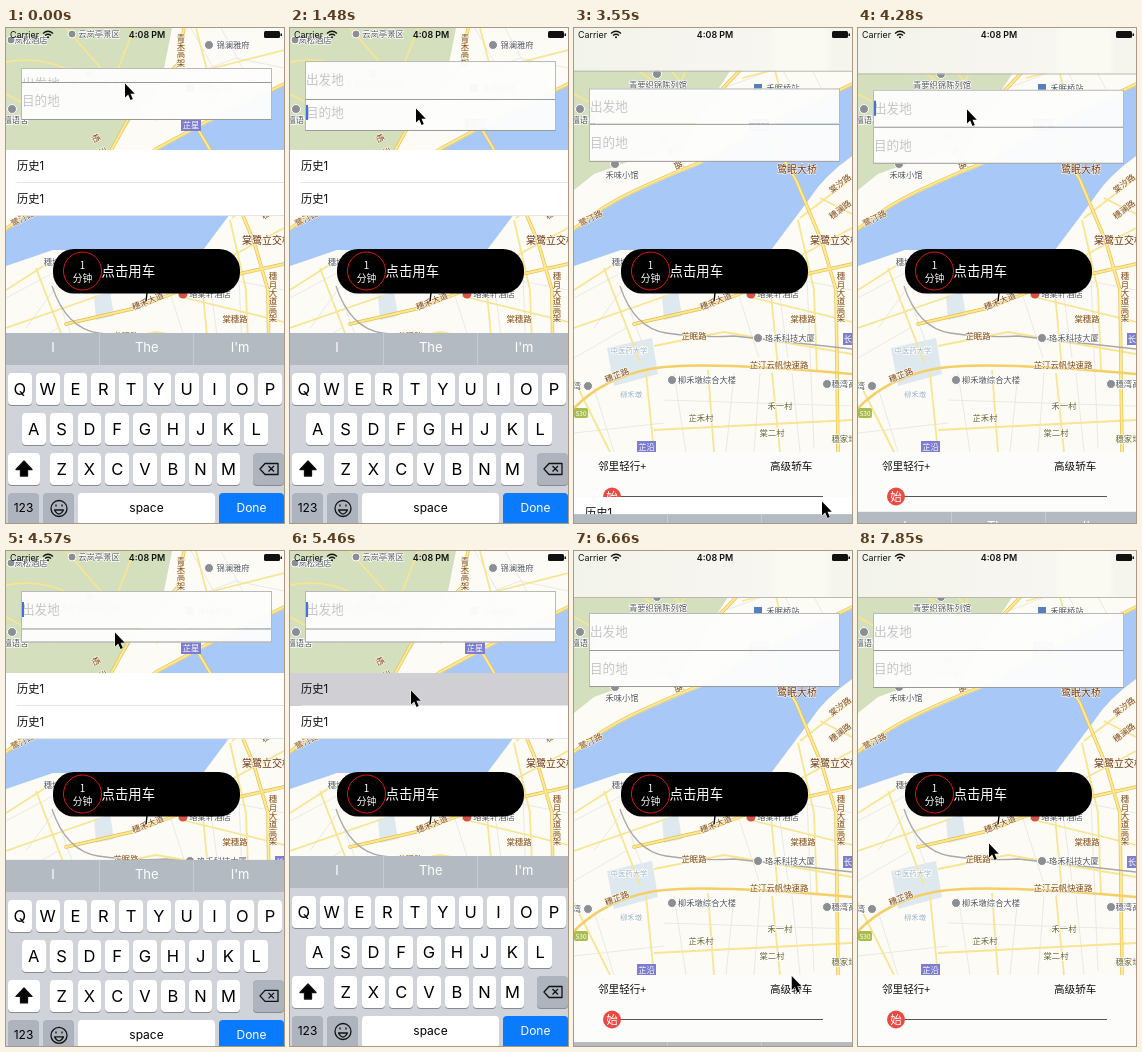
Write an HTML page that moves like this. It is 278x495 px and loops after 8 s.

```html
<!DOCTYPE html>
<html lang="zh">
<head>
<meta charset="utf-8">
<title>Ride booking</title>
<style>
html, body { margin: 0; width: 100%; height: 100%; overflow: hidden; }
#stage { position: relative; width: 278px; height: 495px; overflow: hidden; background: #fcfbf6;
  font-family: "Inter", "Noto Sans CJK SC", "Noto Sans CJK", sans-serif; color: #111; }
#stage > * { position: absolute; left: 0; top: 0; }
svg text { font-family: "Noto Sans CJK SC", "Noto Sans CJK", sans-serif; }
#status text { font-family: "Inter", sans-serif; }
.mid { text-anchor: middle; }
#list { width: 278px; height: 66px; background: #fff; }
.item { position: relative; height: 33px; line-height: 33px; padding-left: 11px; font-size: 11.3px; }
.item::after { content: ""; position: absolute; left: 11px; right: 0; bottom: 0; height: 1px; background: #e4e4e6; }
.item.on { background: #d0d0d4; }
.field { left: 15px !important; width: 251px; box-sizing: border-box; overflow: hidden;
  background: rgba(253,253,252,.97); border: solid #b9b9b9; border-width: 1px 1px 0; }
#to { border-top-color: #999; border-bottom: 1px solid #999; }
.field span { position: absolute; left: 0; height: 18px; line-height: 18px; font-size: 12.6px; font-weight: 300; color: #c6c6ca; white-space: nowrap; }
.field i { position: absolute; left: 0; width: 1.5px; height: 15px; background: #4470dd; }
#nav { width: 278px; height: 46px; border-bottom: 1px solid #b9b8b2;
  background: linear-gradient(90deg, #f2f3ea, #f6f5ef 45%, #f7f6f0 71%, #fbfaf2 73%, #fbfaf2 90%, #f5f4ed 93%); }
#keys { width: 278px; height: 190px; background: #d0d4da; }
#keys > div { position: absolute; box-sizing: border-box; text-align: center; }
.key { height: 31.5px; line-height: 32px; border-radius: 4px; background: #fff; color: #000; font-size: 16.5px; box-shadow: 0 1px 0 #888b90; }
.gray { background: #adb4be; }
.small { font-size: 12px; line-height: 30px; }
.done { background: #0a7aff; color: #fff; }
.done.down { background: #fff; color: #000; }
.hint { top: 0; height: 32px; line-height: 29px; background: #b4bac1; color: #fff; font-size: 13px; }
.hint + .hint { border-left: 1px solid #c6cbd1; }
#keys svg { display: block; margin: auto; }
</style>
</head>
<body>
<div id="stage">
<svg width="278" height="495" fill="none">
  <!-- land and water -->
  <path fill="#d3dfbd" d="M0 0H166L158 40 132 80 106 122 70 128 20 146 0 162Z"/>
  <path fill="#dde9ef" d="M33 320L78 310 84 346 40 358ZM88 268L104 264 108 288 90 292Z"/>
  <path fill="#a8c8f8" d="M0 203Q28 180 60 165T115 141 150 123L200 96 240 76 278 58V128Q250 148 236 170L197 222H47L0 238Z"/>
  <!-- minor streets -->
  <path stroke="#ebe9e3" d="M185 0L230 80M215 0L255 74M150 60L230 30 278 40M120 90L190 70M0 270L60 238M20 300L60 245M0 330L52 300M70 320L52 272M165 268L185 330M205 262L214 330M232 225L240 420M90 372L278 378M100 345L112 424M160 345L152 424M186 345L180 424M218 345L226 424M0 405L90 395M20 360L40 424M190 245L278 262"/>
  <path stroke="#f8e592" stroke-width="1.8" d="M0 34Q55 24 92 66M60 0L112 60M128 0L104 62M190 0L214 92M168 50L278 22M150 92L222 62M0 66L48 92M96 122L112 141M0 262L47 232M0 300L92 268M30 240L66 334M172 268L278 294M196 255L204 340M224 192L240 262 243 344M222 230L278 200M246 170L278 186M226 190L278 150M80 318L150 304 278 326M72 345L80 424M134 342L140 424M80 402L278 392M198 345L206 424M0 352L36 424"/>
  <!-- main roads -->
  <g stroke-linecap="round" stroke-linejoin="round">
    <g id="roads" stroke="#e2bd52" stroke-width="3.400"><path d="M0 201Q28 178 60 163T115 139 150 121L200 94 278 56M178 0L172 36 126 84 100 132M60 296L130 280 196 254 278 236M190 98L222 152 248 214 262 262 264 424"/></g>
    <path stroke="#ffe98f" stroke-width="2.200" d="M0 201Q28 178 60 163T115 139 150 121L200 94 278 56M178 0L172 36 126 84 100 132M60 296L130 280 196 254 278 236M190 98L222 152 248 214 262 262 264 424"/>
    <path stroke="#f5cf66" stroke-width="2.600" d="M0 380Q30 350 76 341T278 346"/>
  </g>
  <path stroke="#a8a8a8" stroke-width="1.300" d="M46 258Q60 300 92 305T160 308L278 321"/>
  <!-- places -->
  <g fill="#8b8f94" stroke="#fff"><circle cx="66" cy="6" r="4"/><circle cx="203" cy="17" r="4.5"/><circle cx="5" cy="12" r="4"/><circle cx="6" cy="81" r="4.5"/><circle cx="83" cy="46" r="4.5"/><circle cx="41" cy="136" r="4.5"/><circle cx="184" cy="310" r="4.5"/><circle cx="98" cy="352" r="4.5"/><circle cx="253" cy="356" r="4.5"/><circle cx="14" cy="358" r="4.5"/></g>
  <rect x="180" y="56" width="8" height="8" fill="#5580bd"/>
  <circle cx="177" cy="266" r="4.5" fill="#d4514c"/>
  <path fill="#7c7cd0" d="M175 91H195V103H175ZM63 413H82V425H63ZM269 305H278V317H269Z"/>
  <rect y="380" width="14" height="10" rx="2" fill="#a9bd4f"/>
  <g class="mid" fill="#54585c" font-size="8.3" stroke="#fff" stroke-width="1.4" paint-order="stroke">
    <text x="93" y="9">云岚亭景区</text><text x="227" y="20">锦澜雅府</text><text x="25" y="15">岚松酒店</text>
    <text x="10" y="95">檀语舍</text><text x="84" y="60">青萝织锦陈列馆</text><text x="209" y="63">禾眠桥站</text>
    <text x="48" y="150">禾味小馆</text><text x="46" y="237">穗坊</text><text x="204" y="269">珞棠轩酒店</text>
    <text x="216" y="313">珞禾科技大厦</text><text x="133" y="355">柳禾墩综合大楼</text><text x="270" y="359">穗湾高</text>
    <text x="3" y="361">湾</text>
    <g fill="#66632c"><text x="127" y="393">芷禾村</text><text x="206" y="381">禾一村</text>
    <text x="198" y="408">棠二村</text><text x="270" y="414">穗家坞</text></g>
    <g fill="#9fb3c0"><text x="55" y="325" font-size="7.400">中医药大学</text><text x="57" y="369" font-size="7.400">柳禾墩</text></g>
  </g>
  <g class="mid" fill="#7c4b25" font-size="8.4" stroke="#fff8e4" stroke-width="1.2" paint-order="stroke">
    <text x="205" y="340">芷汀云帆快速路</text><text x="229" y="294">棠穗路</text><text x="120" y="311">芷眠路</text>
    <text transform="translate(143 276) rotate(-22)">穗禾大道</text>
    <text transform="translate(18 193) rotate(-27)">鹭汀路</text>
    <text transform="translate(44 350) rotate(-22)">穗芷路</text>
    <text transform="translate(268 158) rotate(-38)">棠汐路</text>
    <text transform="translate(268 184) rotate(-38)">穗澜路</text>
    <text transform="translate(96 128) rotate(62)" letter-spacing="7">栖禾路</text>
    <text x="175" y="22" style="writing-mode:vertical-rl">青禾高架</text>
    <text x="267" y="269" style="writing-mode:vertical-rl">穗月大道高架</text>
    <g font-size="10" fill="#693521"><text x="223" y="145">鹭眠大桥</text><text x="261" y="216">棠鹭立交桥</text></g>
  </g>
  <g class="mid" fill="#fff" font-size="8.3"><text x="185" y="100">芷星</text><text x="72.500" y="422">芷沿</text><text x="274" y="314">长</text><text x="7" y="388" font-size="6.500">S30</text></g>
  <!-- call button -->
  <path stroke="#000" stroke-width="1.4" d="M141 265L140 273"/>
  <rect x="47" y="221" width="187" height="44.500" rx="21" fill="#000"/>
  <circle cx="76.500" cy="243" r="19" stroke="#e3180c"/>
  <g fill="#fff" font-weight="300"><g class="mid" font-size="9.8"><text x="76.500" y="241">1</text><text x="76.500" y="253.500">分钟</text></g>
  <text x="95.500" y="248" font-size="13.4">点击用车</text></g>
  <!-- service bar -->
  <path fill="#fcfcfb" d="M0 424H278V495H0Z"/>
  <path stroke="#555" d="M38 468.500H249"/>
  <circle cx="38" cy="468.500" r="9" fill="#ea4a42"/>
  <text class="mid" x="38" y="472.500" font-size="11.5" fill="#fff">始</text>
  <g fill="#111" font-size="10.6"><text x="24" y="442">邻里轻行+</text><text x="196" y="442">高级轿车</text></g>
</svg>
<div id="list"><div class="item" id="pick">历史1</div><div class="item">历史1</div></div>
<div class="field" id="from"><span>出发地</span><i></i></div>
<div class="field" id="to"><span>目的地</span><i></i></div>
<div id="nav"></div>
<div id="keys"></div>
<svg id="status" width="278" height="14" fill="none" stroke="#111">
  <g fill="#111" stroke="none" font-size="8.9"><text x="4" y="10">Carrier</text>
  <text class="mid" x="141" y="10" font-weight="600">4:08 PM</text></g>
  <path stroke-width="1.300" d="M37 5.500Q42 1 47 5.500M39 7.500Q42 5 45 7.500"/><circle cx="42" cy="9.200" r="1" fill="#111" stroke="none"/>
  <rect x="258" y="3" width="16" height="7" rx="1.500" fill="#111" stroke="none"/>
  <path fill="#111" stroke="none" d="M274.500 5.500H276V8H274.500Z"/>
</svg>
<svg id="mouse" width="16" height="22" style="overflow:visible"><path d="M1 1.500V15.500L4.200 12.500 6.500 18 8.800 17 6.500 11.700H10.800Z" fill="#000" stroke="#fff" paint-order="stroke"/></svg>
</div>
<script>
const $ = id => document.getElementById(id);
const keys = $('keys');

function add(cls, x, y, w, html) {
  const el = document.createElement('div');
  el.className = cls;
  el.style.cssText = `left:${x}px;top:${y}px;width:${w}px`;
  el.innerHTML = html;
  keys.append(el);
  return el;
}
const icon = d => `<svg width="24" height="32" fill="none" stroke="#111" stroke-width="1.3" stroke-linejoin="round"><path d="${d}"/></svg>`;

['I', 'The', "I'm"].forEach((s, i) => add('hint', i * 93.3, 0, 94, s));
['QWERTYUIOP', 'ASDFGHJKL', 'ZXCVBNM'].forEach((row, r) =>
  [...row].forEach((c, i) => add('key', 2 + [0, 13.9, 41.7][r] + i * 27.8, 40 + r * 40, 23.8, c)));
add('key', 2, 120, 31.500, icon('M12 8L20 16.500H15.500V23H8.500V16.500H4Z')).querySelector('path').setAttribute('fill', '#000');
add('key gray', 247, 120, 31, icon('M3 16L8 10.500H21V21.500H8ZM11.500 13L17 18.500M17 13L11.500 18.500'));
add('key gray small', 2, 160, 31, '123');
add('key gray', 37, 160, 31, icon('M4 15.500A8 8 0 0 1 20 15.500A8 8 0 0 1 4 15.500ZM7.500 17Q12 25 16.500 17ZM9 11.500V13.500M15 11.500V13.500'));
add('key small', 72, 160, 137, 'space');
const done = add('key small done', 213, 160, 65, 'Done');

const LOOP = 8000, STEP = LOOP / 54;
const HIDE = 3290, SHOW = 4275, HIDE2 = 6348;
const SWAP1 = 20, SWAP2 = 1340, HALF = 185;

// top, divider, bottom, first text, second text
const REST = [62, 99, 136.5, 81, 118];
const FULL = [32, 70, 105, 51, 83];
const FROM = [40, 77.5, 91.5, 58.5, 97];
const TO = [40, 54, 91.5, 55.5, 72.5];

// step, x, y
const PATH = [
  [0, 118, 54], [3, 118, 54], [8, 125, 79], [12, 125, 79], [17, 188, 266], [21, 247, 472],
  [24, 247, 472], [25, 202, 252], [27, 108, 80], [32, 108, 80], [36, 120, 138], [38, 120, 138],
  [42, 239, 477], [44, 239, 477], [48, 150, 263], [49, 150, 263], [53, 130, 291]
];

const clamp = u => Math.max(0, Math.min(1, u));
const ease = u => (1 - Math.cos(Math.PI * clamp(u))) / 2;
const mix = (a, b, u) => a.map((v, i) => v + (b[i] - v) * u);
const slide = ms => ease(ms / 320);
function spring(ms) {
  const w = Math.max(0, ms) * .01826;
  return 1 - (1 + w) * Math.exp(-w);
}

function opened(t, curve) {
  if (t < SHOW) return 1 - curve(t - HIDE);
  return t < HIDE2 ? curve(t - SHOW) : 1 - curve(t - HIDE2);
}

function swap(a, b, ms) {
  return ms < HALF ? mix(a, FULL, ease(ms / HALF)) : mix(FULL, b, ease(ms / HALF - 1));
}

function pose(t) {
  if (t < SWAP2) return swap(TO, FROM, t - SWAP1);
  return t < SHOW ? swap(FROM, TO, t - SWAP2) : FROM;
}

function mouseAt(k) {
  const i = Math.max(1, PATH.findIndex(p => p[0] >= k));
  const a = PATH[i - 1], b = PATH[i];
  return mix(a, b, (k - a[0]) / (b[0] - a[0]));
}

function place(id, y, x = 0) { $(id).style.transform = `translate(${x}px,${y}px)`; }

function field(id, top, bottom, text, caret) {
  const el = $(id), [label, bar] = el.children;
  place(id, top);
  el.style.height = bottom - top + 'px';
  label.style.top = text - top - 10 + 'px';
  bar.style.top = text - top - 8.5 + 'px';
  bar.style.opacity = caret ? 1 : 0;
}

function draw(now) {
  const k = Math.min(53, Math.floor((now % LOOP + 25) / STEP));
  const t = k * STEP;
  const open = opened(t, slide);

  const [top, line, bottom, y1, y2] = mix(REST, pose(t), open);
  const start = t < SWAP2 ? SWAP1 : t < SHOW ? SWAP2 : SHOW;
  const beat = (t - start) % 1000;
  const blink = t >= SWAP1 && !(beat > 500 && beat < 850) && !(t > HIDE && t < SHOW) && t < HIDE2;
  const second = t >= SWAP2 && t < SHOW;
  field('from', top, line, y1, blink && !second);
  field('to', line, bottom, y2, blink && second);

  place('nav', -47 * open);
  place('list', 495 - 373 * open);
  place('keys', 495 - 190 * opened(t, spring));
  $('pick').classList.toggle('on', t > 5450);
  done.classList.toggle('down', (t > 3200 && t < 3500) || (t > 6200 && t < 6300));

  const [, x, y] = mouseAt(k);
  place('mouse', y, x);
}

function tick() {
  draw(performance.now());
  requestAnimationFrame(tick);
}
tick();
</script>
</body>
</html>
```
